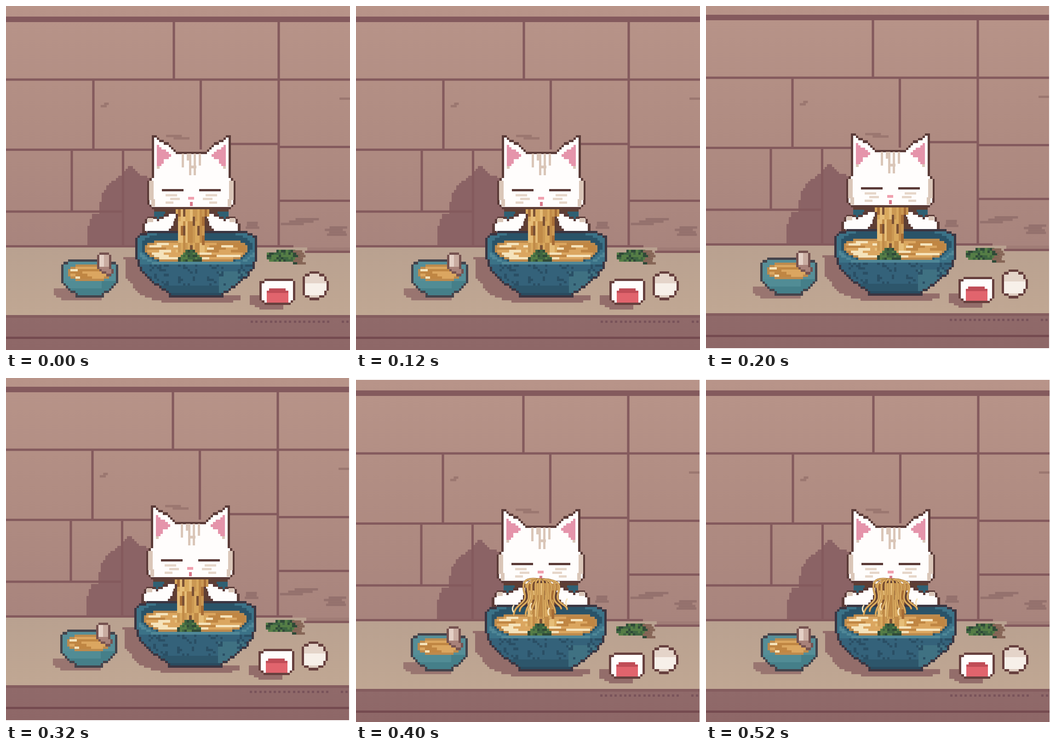
An HTML page with a canvas that plays this animation: 748x748 px, repeating every 0.6 s.

```html
<!DOCTYPE html>
<html lang="en">
<head>
<meta charset="utf-8">
<title>Noodle cat</title>
<style>
html, body { margin: 0; width: 100%; height: 100%; overflow: hidden; background: #fff; }
canvas { display: block; }
</style>
</head>
<body>
<canvas id="stage" width="748" height="748"></canvas>
<script>
const SIZE = 748, CELL = 5.2, CAT_X = 403;
const OUT = '#5b3b38', LINE = '#845a5d', SHADE = '#8b6365', BEIGE = '#dac6b8', WHITE = '#fffdfc', EMBER = '#5f3f34';
const snap = i => Math.round(i * CELL);
const hash = (x, y = 0) => { const n = Math.sin(x * 12.99 + y * 78.23) * 43758.5; return n - Math.floor(n); };
let g;

function rect(color, x, y, w, h) {
  g.fillStyle = color;
  g.fillRect(x, y, w, h);
}

// the same rectangle on both sides of the cat's axis
function pair(color, x, y, w, h) {
  rect(color, x, y, w, h);
  rect(color, 2 * CAT_X - x - w, y, w, h);
}

// Rasterise a path on the cell grid. A fill may depend on the place, an axis
// adds the mirror image, and an outline is one cell wide.
function shape(d, fill, { line, axis } = {}) {
  const path = new Path2D(d), flip = new Path2D();
  if (axis) flip.addPath(path, new DOMMatrix([-1, 0, 0, 1, 2 * axis, 0]));
  const inside = (c, r) => {
    const x = (c + .5) * CELL, y = (r + .5) * CELL;
    return g.isPointInPath(path, x, y) || g.isPointInPath(flip, x, y);
  };
  const n = Math.ceil(SIZE / CELL);
  for (let r = 0; r < n; r++) for (let c = 0; c < n; c++) {
    if (!inside(c, r)) continue;
    const edge = line && !(inside(c - 1, r) && inside(c + 1, r) && inside(c, r - 1) && inside(c, r + 1));
    const color = edge ? line : typeof fill === 'function' ? fill(c, r, c * CELL, r * CELL) : fill;
    rect(color, snap(c), snap(r), snap(c + 1) - snap(c), snap(r + 1) - snap(r));
  }
}

function stroke(d, color, width) {
  g.strokeStyle = color;
  g.lineWidth = width;
  g.stroke(new Path2D(d));
}

function gradient(y0, y1, ...colors) {
  const grad = g.createLinearGradient(0, y0, 0, y1);
  colors.forEach((c, i) => grad.addColorStop(i / (colors.length - 1), c));
  return grad;
}

// rows of ragged dashes
function stain(color, x, y, w, rows) {
  for (let i = 0; i < rows; i++) {
    const from = hash(x, i) * .4 * w;
    rect(color, x + from, y + i * CELL, w * (.4 + .2 * hash(y, i)), CELL);
  }
}

function wall() {
  rect(gradient(0, 530, '#b89489', '#b08c82', '#a8847d'), 0, 0, SIZE, 530);
  stain('#9b7770', 204, 210, 24, 2);
  stain('#9b7770', 345, 280, 58, 2);
  stain('#94716d', 510, 469, 50, 3);
  stain('#94716d', 597, 461, 90, 3);
  stain('#94716d', 684, 479, 90, 4);
  rect('#9b7770', 725, 199, 23, 5);
  shape('M176 521V490L188 452H203L207 412L222 388L252 367L267 350H275L290 367L320 375V521Z', SHADE);
  rect(LINE, 0, 23, SIZE, 12);
  stroke('M0 160H748M0 312.5H320M488 300H593M593 306.5H748M593 423.5H748M0 447H254' +
    'M365 35V160M593 35V522M190 160V312M423.5 160V312M143 312V447M254.5 312V522', LINE, 5.2);
}

function table() {
  rect(gradient(525, 672, '#b9a190', '#c0a793'), 0, 525, SIZE, 147);
  rect('#a07c76', 655, 525, 93, 8);
  stroke('M0 522.5H625M650 534.5H748', LINE, 5.2);
  rect(gradient(672, 748, '#906a6a', '#8e6767'), 0, 672, SIZE, 76);
  rect('#855d5f', 0, 672, SIZE, 6);
  rect('#754b50', 0, 719, SIZE, 5);
  for (let x = 532; x < 740; x += 10.4) if (x < 705 || x > 725) rect('#79535a', Math.round(x), 684, 5, 5);
  shape('M257 546H300L365 628H510V636L490 645H345L290 628L262 590Z', '#936d6a');
  shape('M106 616H135L213 632L208 641H130L106 630Z', '#997570');
  shape('M533 627H555L575 648H603V658H550L533 648Z', '#936d6a');
}

function cat() {
  const both = { axis: CAT_X, line: OUT };
  shape('M403 444H322L316 494H403Z', EMBER, { axis: CAT_X });
  pair('#2f6073', 322, 447, 24, 16);
  shape('M299 494V472Q304 460 318 457L330 462L352 450L376 446V462L366 480L350 494Z', WHITE, both);
  pair(WHITE, 306, 480, 48, 12);
  pair(BEIGE, 308, 461, 12, 9);
  shape('M403 317H369L354 299L333 288L327 281H316V373Q305 382 306 398V418Q308 436 321 444H403Z', WHITE, both);
  pair(BEIGE, 311, 380, 10, 42);
  pair(BEIGE, 316, 420, 8, 16);
  pair(BEIGE, 328, 338, 6, 16);
  shape('M328 301L358 321V327L344 334L337 350H328Z', '#e594ab', { axis: CAT_X });
  // forehead stripes, eyes, whiskers
  for (const [i, len] of [[-4, 30], [-2, 15], [-1, 47], [1, 47], [3, 26]])
    rect(BEIGE, snap(77.5 + i), 321, 5, len);
  rect(BEIGE, 398, 347, 16, 6);
  pair(OUT, 339, 398, 47, 5);
  for (let i = 0; i < 3; i++) pair('#e6d6c9', 347 + i % 2 * 10, 409 + i * 8, 25 - i * 4, 5);
  rect('#f0a0ae', 396, 415, 13, 6);
  rect('#d8788a', 400, 426, 6, 9);
}

// broth with floating pieces, paler towards the front
function broth(d, top, depth, axis) {
  shape(d, (c, r, x, y) => {
    const h = hash(Math.floor((c + r * 3) / 5), r), near = (y - top) / depth;
    return h > .85 - near * .4 ? '#f5e3bb' : h < .25 ? '#c08643' : '#dba660';
  }, { axis, line: '#bd8a4d' });
}

const leaf = (c, r) => ['#2f4a38', '#3e6541', '#557d46'][Math.floor(hash(c, r) * 3)];

function bigBowl() {
  const axis = 414.5;
  shape('M415 488H330Q284 490 281 512V535Q285 576 314 597Q335 615 354 626V636H415Z', (c, r, x, y) => {
    if (y > 622) return '#294b5f';
    if (y < 560) return '#3b7287';
    const speck = hash(c, r) > .72 && Math.sin(x / 10) > -.3;
    if (speck && y < 605) return '#2a4f65';
    return x > 460 && y > 575 ? '#3f7182' : y > 605 ? '#2d566b' : '#34627a';
  }, { axis, line: '#3b3541' });
  shape('M415 494H345Q296 500 294 524Q300 548 340 557H415Z', '#2a5368', { axis });
  shape('M292 534Q306 558 345 559H415V564H340Q300 558 288 540Z', '#4f8797', { axis });
  broth('M415 508H350Q302 512 301 526Q306 548 345 557H415Z', 508, 50, axis);
}

function noodles() {
  rect(EMBER, 364, 438, 84, 6);
  pair(EMBER, 366, 462, 12, 20);
  shape('M367 444H444V456H434V520L440 537H370L375 520V460Z', (c, r, x) => {
    if (hash(c, Math.floor(r / 4)) > .83) return x > 380 && x < 425 ? '#7a5034' : '#a66c36';
    return ['#c18b48', '#d9a95e', '#e6bd77', '#cb9853'][Math.floor(hash(c * 3, Math.floor(r / 9)) * 4)];
  });
  shape('M372 558L376 546L392 532H412L428 548V558Z', leaf);
}

function smallBowl() {
  const axis = 181.5;
  shape('M182 549H152Q122 553 118 572V594Q126 614 150 627V636H182Z',
    (c, r, x, y) => y > 625 ? '#376472' : y > 596 ? (x > 205 || y > 612 ? '#457f89' : '#518c95') : '#568e97',
    { axis, line: '#44434b' });
  broth('M182 563H158Q136 567 134 580Q140 594 158 598H182Z', 563, 50, axis);
  shape('M198 545L203 538H221L230 545L227 567L233 572V583L222 587L198 572Z',
    (c, r, x, y) => y > 566 ? '#a88179' : x > 213 ? '#c9aca1' : '#e4d0c6', { line: '#765250' });
}

function sides() {
  shape('M566 547L570 536L622 528L640 543V557L627 562L614 554L592 557L575 555Z', leaf);
  stain('#876657', 624, 531, 34, 6);
  shape('M591 591H572Q554 594 551 606V632Q554 647 572 650H591Z', WHITE, { axis: 590.5, line: '#67403e' });
  shape('M591 613H573V618H568V643H591Z', (c, r, x, y) => y < 622 ? '#c04d57' : '#e1646d', { axis: 590.5 });
  shape('M672 579H662Q643 586 643 604V618Q646 634 664 638H672Z',
    (c, r, x, y) => y > 627 ? '#dfcec2' : y < 601 ? '#e4d4c9' : '#f7f0e9', { axis: 671.5, line: '#67403e' });
}

function looseStrands() {
  rect(WHITE, 364, 438, 20, 5);
  rect(WHITE, 424, 438, 20, 5);
  g.lineCap = 'round';
  const count = 10;
  for (let i = 0; i < count; i++) {
    const s = i / (count - 1) * 2 - 1, x = 404 + s * 5;
    const bulge = 404 + s * 42, end = 402 + s * 58, low = 522 - 26 * hash(i, 4);
    const d = `M${x} 434C${bulge} ${428 + 10 * hash(i)} ${bulge} 445 ${404 + s * 36} 466S${end} 488 ${end} ${low}`;
    stroke(d, '#a3713a', 4.5);
    stroke(d, '#dcae62', 3);
    if (i % 3 === 0) stroke(`M${end} ${low - 22}q-5 6 -1 14`, '#f7e4bc', 3);
  }
}

function scene(loose) {
  const c = document.createElement('canvas');
  c.width = c.height = SIZE;
  g = c.getContext('2d');
  wall(); table(); cat(); bigBowl(); noodles(); smallBowl(); sides();
  if (loose) looseStrands();
  return c;
}

const tidy = scene(false), messy = scene(true);
const poses = [[tidy, 0, 0], [tidy, -2, -4], [messy, -1, 4]];
const view = document.getElementById('stage').getContext('2d');
const start = performance.now();

function draw() {
  const t = Math.max(0, performance.now() - start) % 600;
  const [img, x, y] = poses[Math.floor(t / 200)];
  view.fillStyle = '#fff';
  view.fillRect(0, 0, SIZE, SIZE);
  view.drawImage(img, x, y);
  requestAnimationFrame(draw);
}
draw();
</script>
</body>
</html>
```
